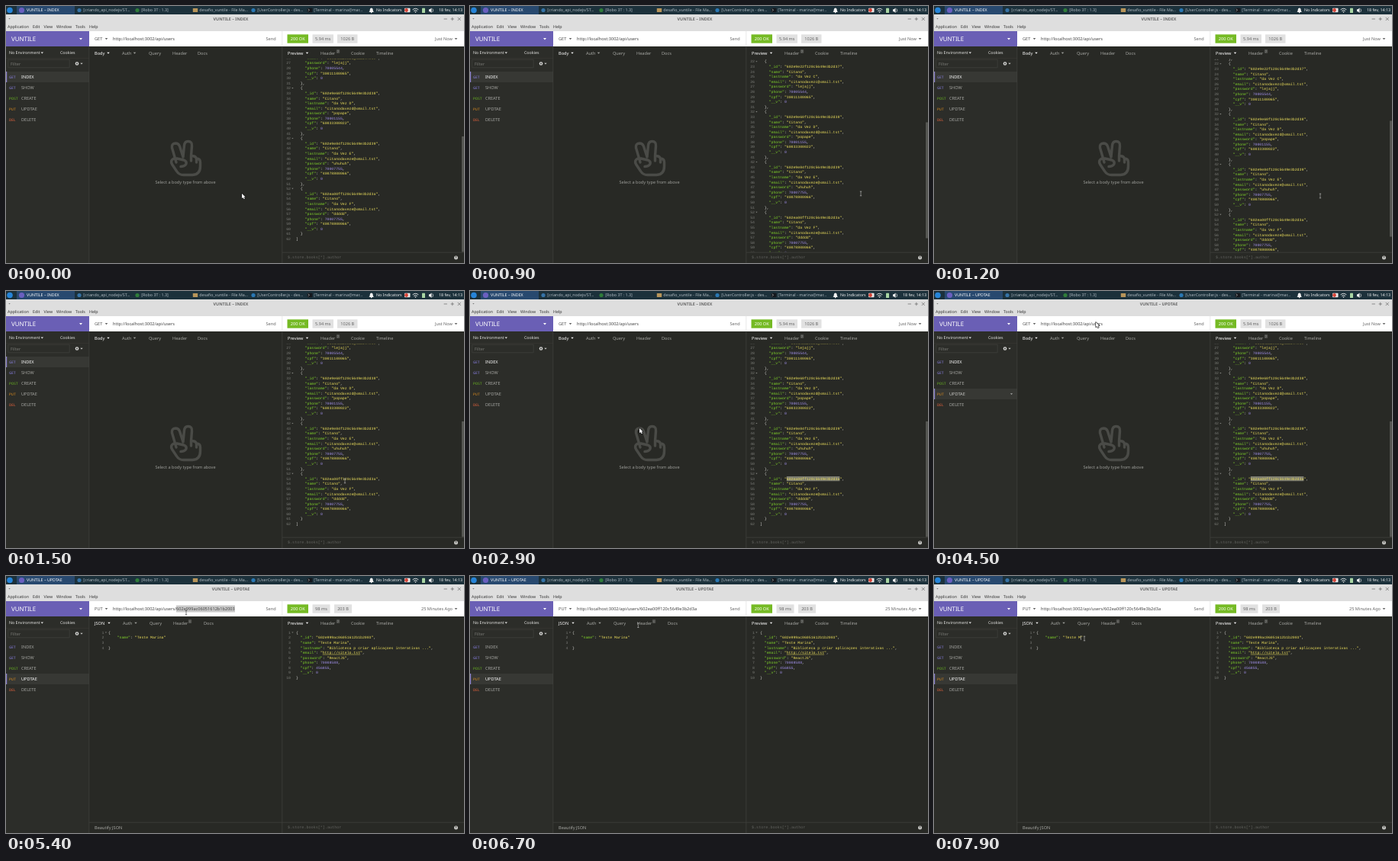
These frames come from a looping animation (600 by 337 pixels, 8 s). An HTML page with a canvas:

```html
<!DOCTYPE html>
<html lang="pt">
<head>
<meta charset="utf-8">
<title>API client</title>
<style>
html, body { margin: 0; width: 100%; height: 100%; overflow: hidden; background: #282925; }
canvas { display: block; }
</style>
</head>
<body>
<canvas id="stage" width="600" height="337"></canvas>
<script>
const ctx = document.getElementById('stage').getContext('2d');
ctx.textRendering = 'geometricPrecision';

const LOOP = 8000, STEP = 100;
const UI = '"Noto Sans", sans-serif', MONO = '"Liberation Mono", monospace';
const CODE = 4.83, CHAR = CODE * 0.6, LINE = 6.59;
const PROJECT = 'VUNTILE';
const KEY = '#7ecf2b', STRING = '#ecdf5c', NUMBER = '#a08fea', PLAIN = '#d8d8d4';
const BASE_URL = 'http://localhost:3002/api/users';
const OLD_ID = '602e999ac06051612b1b2003', NEW_ID = '602ea00ff120c5649e3b2d3a';

const REQUESTS = [
  ['GET', 'INDEX', '#8d84ea'], ['GET', 'SHOW', '#8d84ea'], ['POST', 'CREATE', '#6dbb22'],
  ['PUT', 'UPDTAE', '#e3901f'], ['DEL', 'DELETE', '#f0663f'],
];

// id, letter, email letter, password, phone, cpf
const USERS = [
  ['602e9d10f120c5649e3b2d35', 'A', 'a', 'abcabc', 70001010, '10020030044'],
  ['602e9dc1f120c5649e3b2d36', 'B', 'b', 'xyzxyz', 70002020, '20030040055'],
  ['602e9e22f120c5649e3b2d37', 'C', 'c', 'lejajj', 70005544, '30011100065'],
  ['602e9e60f120c5649e3b2d38', 'D', 'd', 'popape', 70001155, '60033300022'],
  ['602e9e84f120c5649e3b2d39', 'E', 'e', 'uhuhuh', 70007755, '40078800066'],
  [NEW_ID, 'F', 'e', 'ddddd', 70007755, '40078800066'],
];

const fields = (id, name, lastname, email, password, phone, cpf) => [
  `"_id": "${id}",`, `"name": "${name}",`, `"lastname": "${lastname}",`, `"email": "${email}",`,
  `"password": "${password}",`, `"phone": ${phone},`, `"cpf": ${cpf},`, '"__v": 0',
];
const indent = (lines, n) => lines.map(line => ' '.repeat(n) + line);

const userList = ['[', ...USERS.flatMap(([id, letter, mail, pass, phone, cpf], i) => indent([
  '{',
  ...indent(fields(id, 'Citano', 'da Vez ' + letter, `citanodavez${mail}@xmail.tst`, pass, phone, `"${cpf}"`), 2),
  i < USERS.length - 1 ? '},' : '}',
], 2)), ']'];

const singleUser = ['{', ...indent(fields(OLD_ID, 'Teste Marina',
  'Biblioteca p criar aplicaçoes interativas ...', 'http://sitelo.tst', 'ReactJS', 70008588, 456855), 2), '}'];

const SCROLL = [[400, 0], [500, 6], [900, 31], [1000, 42], [1100, 46], [1200, 34], [1300, 2], [1400, 0]];
const MOUSE = [
  [0, 309, 246], [100, 370, 249], [300, 515, 250], [500, 514, 249], [900, 512, 246], [1200, 506, 249],
  [1300, 500, 249], [1400, 470, 249], [1500, 444, 249], [2800, 444, 249], [2900, 222, 180], [3200, 130, 158],
  [3700, 32, 134], [4300, 32, 134], [4400, 140, 80], [4500, 212, 41], [5100, 228, 46], [5300, 236, 48],
  [6200, 236, 48], [6500, 232, 56], [7100, 197, 82],
];

// Linear interpolation of every value column over time
function track(keys, t) {
  const next = keys.findIndex(k => k[0] > t);
  if (next < 0) return keys.at(-1).slice(1);
  if (next === 0) return keys[0].slice(1);
  const a = keys[next - 1], b = keys[next], p = (t - a[0]) / (b[0] - a[0]);
  return a.slice(1).map((v, i) => v + (b[i + 1] - v) * p);
}

function rect(x, y, w, h, color, radius = 0) {
  ctx.fillStyle = color;
  ctx.beginPath();
  ctx.roundRect(x, y, w, h, radius);
  ctx.fill();
}

function dot(x, y, r, color) {
  ctx.fillStyle = color;
  ctx.beginPath();
  ctx.arc(x, y, r, 0, 7);
  ctx.fill();
}

// y is the middle of the capitals
function text(str, x, y, color, size = 5.6, { align = 'left', font = UI, weight = 400 } = {}) {
  ctx.font = `${weight} ${size}px ${font}`;
  ctx.textAlign = align;
  ctx.fillStyle = color;
  ctx.fillText(str, x, y + size * 0.36);
}

function caret(x, y, color, r = 2) {
  ctx.fillStyle = color;
  ctx.beginPath();
  ctx.moveTo(x - r, y - r / 2);
  ctx.lineTo(x + r, y - r / 2);
  ctx.lineTo(x, y + r * 0.7);
  ctx.fill();
}

function strokePath(d, color, width) {
  ctx.strokeStyle = color;
  ctx.lineWidth = width;
  ctx.lineJoin = ctx.lineCap = 'round';
  ctx.stroke(new Path2D(d));
}

function codeLine(line, x, y) {
  for (const m of line.matchAll(/("[^"]*"(?=:))|("[^"]*")|(\d+)|[^"\d\s]+/g)) {
    const color = m[1] ? KEY : m[2] ? STRING : m[3] ? NUMBER : PLAIN;
    const at = x + m.index * CHAR;
    text(m[0], at, y, color, CODE, { font: MONO });
    if (m[0].includes('http')) rect(at + CHAR, y + 2.5, (m[0].length - 2) * CHAR, 0.5, color);
  }
}

function codeBlock(lines, x, y, gutter) {
  lines.forEach((line, i) => {
    const ly = y + i * LINE;
    if (ly < 62 || ly > 330) return;
    text(i + 1, gutter, ly, '#7b7c78', CODE, { font: MONO, align: 'right' });
    if (/[{[]$/.test(line)) caret(gutter + 2.4, ly, '#8b8c88', 1.1);
    codeLine(line, x, ly);
  });
}

function badge(n, x) {
  rect(x - 2.2, 57, 4.4, 5, '#50514d', 1);
  text(n, x, 59.5, '#bbb', 3.2, { align: 'center' });
}

function desktopBar(title) {
  rect(0, 0, 600, 11, '#1c313b');
  dot(5, 5.5, 3.8, '#2684d8');
  rect(14, 0, 76, 11, '#28496f');
  dot(20.5, 5.5, 3.6, '#6a5fc0');
  text(title, 27, 5.5, '#fff', 5.3);
  const tasks = [
    [96, '#3674a8', '[criando_api_nodejs/ST…'], [172, '#2f7d3a', '[Robo 3T : 1.3]'],
    [248, '#b8955a', 'desafio_vuntile - File Ma…'], [324, '#2a78b4', '[UserController.js - des…'],
    [398, '#15181d', '[Terminal - marina@mar…'],
  ];
  for (const [x, color, label] of tasks) {
    if (x === 248) rect(x - 3.2, 3, 6.4, 5, color, 0.6);
    else if (x === 398) {
      rect(x - 3.2, 2.7, 6.4, 5.6, color, 0.6);
      strokePath('M396 4l1.500 1.300l-1.500 1.300', '#ddd', 0.6);
    } else dot(x, 5.5, 2.6, color);
    text(label, x + 5.3, 5.5, '#b3bdc4', 5.3);
  }
  ctx.fillStyle = '#f4f4f4';
  ctx.fill(new Path2D('M475.500 8q1.200-1 1.200-3q0-2.500 2-2.500t2 2.500q0 2 1.200 3z'));
  dot(478.7, 8.6, 0.8, '#f4f4f4');
  text('No Indicators', 485, 5.5, '#f4f4f4', 5.3);
  rect(522, 2.7, 7.5, 5.6, '#e8e8e8', 0.8);
  dot(524.5, 5.5, 2.4, '#d54438');
  strokePath('M533 4.600q3.500-2.800 7 0M534.500 6.300q2-1.600 4 0', '#f4f4f4', 0.9);
  dot(536.5, 8, 0.8, '#f4f4f4');
  rect(545, 2.7, 4, 6.3, '#a9d6a4', 0.5);
  ctx.fillStyle = '#f4f4f4';
  ctx.fill(new Path2D('M554 4.300h1.500l2-1.800v6.500l-2-1.800h-1.500z'));
  strokePath('M559 3.800q1.500 1.900 0 3.800', '#f4f4f4', 0.7);
  text('18 fev, 14:13', 567, 5.5, '#f4f4f4', 5.3);
}

function windowBar(title) {
  rect(0, 11, 600, 22, '#dedede');
  caret(4.5, 16.7, '#777', 1.2);
  text(title, 294.5, 16.7, '#666', 5.4, { align: 'center', weight: 600 });
  strokePath('M574 17h3.500M583 17h3.500M584.750 15.250v3.500M592 15.250l3.500 3.500M595.500 15.250l-3.500 3.500', '#666', 0.7);
  [['Application', 2], ['Edit', 35], ['View', 49.5], ['Window', 66], ['Tools', 91], ['Help', 109]]
    .forEach(([label, x]) => text(label, x, 27.2, '#333', 5.3));
}

function sidebar(t, active) {
  rect(0, 33, 109, 304, '#2c2d29');
  rect(0, 33, 109, 20, '#6a5fb5');
  text(PROJECT, 7, 43, '#fff', 7.9);
  caret(98, 43, '#fff');
  text('No Environment', 4, 61.3, '#e4e4e2', 5.3);
  caret(47.3, 61.3, '#e4e4e2', 1.8);
  text('Cookies', 71, 61.3, '#e4e4e2', 5.3);
  rect(0, 68.5, 109, 0.5, '#3a3b37');
  ctx.strokeStyle = '#41423e';
  ctx.lineWidth = 0.7;
  ctx.strokeRect(3.2, 70.2, 80, 10.6);
  text('Filter', 6, 75.5, '#767773');
  dot(93, 75.5, 2.3, '#d8d8d6');
  dot(93, 75.5, 0.9, '#2c2d29');
  caret(99, 75.5, '#d8d8d6', 1.6);

  const lit = t < 2000 ? 0 : t >= 3600 ? 3 : -1;
  REQUESTS.forEach(([method, name, color], i) => {
    const y = 93 + i * 14;
    if (i === lit) {
      rect(0, y - 7, 109, 14, '#373834');
      rect(0, y - 7, 1.2, 14, '#8d84d0');
    }
    text(method, 4, y, color, 4.6, { weight: 500 });
    text(name, 20, y, i === active ? '#fff' : i === lit ? '#c8c8c5' : '#a5a6a2');
  });
  if (t >= 3900 && t < 4700) caret(101.5, 135, '#aaa', 1.6);
  rect(108.5, 53, 0.7, 284, '#41423e');
}

function emptyBody() {
  strokePath('M223 205L217.500 186q-1-5.500 4.500-6q4 0 5.500 4L232 198L233.500 183q.500-5.500 5-5.500q5.500 0 5 6' +
    'L242.500 197q5.500-1 7 3q5 0 5 5v5q0 11-10 11.500h-12q-6 0-9-5l-6-9q-2.500-5 1.500-7q1.500-1 5-.500L233 202' +
    'q4 1.500 3 5q-1 3-7 3.500M242.500 197v6M249.500 200v5', '#4a4b47', 3.4);
  text('Select a body type from above', 235, 231, '#9b9c98', 5.6, { align: 'center' });
}

function requestPane(t, put) {
  rect(109, 33, 253, 20, '#fff');
  text(put ? 'PUT' : 'GET', 116, 43, '#555');
  caret(131.5, 43, '#666', 1.8);
  if (t >= 5300 && t < 6100) rect(223, 38.5, 77, 9, '#c9c9c9');
  text(BASE_URL + (put ? '/' + (t < 6100 ? OLD_ID : NEW_ID) : ''), 140, 42.8, '#444');
  text('Send', 340.5, 42.8, '#666');

  const tabs = put
    ? [['JSON', 116, 135], ['Auth', 153, 170], ['Query', 188], ['Header', 219], ['Docs', 259]]
    : [['Body', 116, 134], ['Auth', 152, 168.5], ['Query', 187], ['Header', 218], ['Docs', 251]];
  tabBar(tabs);
  if (!put) return emptyBody();
  badge(1, 241);
  const name = t < 7800 ? 'Teste Marina' : t < 7900 ? 'Teste Mar' : 'Teste M';
  codeBlock(['{', `    "name": "${name}"`, '', '}'], 134, 74, 128.5);
  if (t >= 7100) rect(146 + (9 + name.length) * CHAR, 78.3, 0.5, 5.6, '#ddd');
  rect(109, 322.7, 253, 0.7, '#41423e');
  text('Beautify JSON', 116, 329.8, '#a5a6a2');
}

function tabBar(tabs) {
  tabs.forEach(([label, x, arrow], i) => {
    const color = i ? '#a5a6a2' : '#fff';
    text(label, x, 61.5, color);
    if (arrow) caret(arrow, 61.5, color, 1.7);
  });
}

function responsePane(t, put) {
  rect(362, 33, 238, 20, '#fff');
  const pills = put ? [['98 ms', 401.5, 23], ['203 B', 430, 23]] : [['5.94 ms', 401.5, 27.5], ['1026 B', 434, 26.5]];
  for (const [label, x, w, bg = '#e1e1e1', color = '#666'] of [['200 OK', 368.5, 27.5, '#75ba24', '#fff'], ...pills]) {
    rect(x, 37.3, w, 11.4, bg);
    text(label, x + w / 2, 43, color, 5.6, { align: 'center' });
  }
  text(put ? '25 Minutes Ago' : 'Just Now', 585, 42.8, '#666', 5.6, { align: 'right' });
  caret(589.5, 43, '#666', 1.8);
  tabBar([['Preview', 369, 394.5], ['Header', 412], ['Cookie', 452], ['Timeline', 485]]);
  badge(7, 435);

  ctx.save();
  ctx.beginPath();
  ctx.rect(362, 69.5, 238, 253);
  ctx.clip();
  if (put) codeBlock(singleUser, 380, 74, 373);
  else {
    const [scroll] = track(SCROLL, t);
    const top = 246 - 52 * LINE + scroll;
    if (t >= 2000) rect(414.8, 243, 24 * CHAR, 6.3, '#7b7b70');
    codeBlock(userList, 380, top, 373);
    rect(597, 171 - scroll * 0.6, 3, 152, '#555652');
  }
  ctx.restore();

  rect(362, 322.7, 238, 0.7, '#41423e');
  text('$.store.books[*].author', 369, 329.5, '#61625e', 5.1, { font: MONO });
  dot(589.5, 330, 2.5, '#c4c4c1');
  text('?', 589.5, 330, '#282925', 4, { align: 'center', weight: 700 });
  rect(361.5, 33, 0.7, 20, '#e0e0e0');
  rect(361.5, 53, 0.7, 284, '#41423e');
}

function pointer(t) {
  const [x, y] = track(MOUSE, t);
  const beam = (t >= 200 && t < 2900) || t >= 4800;
  if (beam) {
    const color = y < 53 ? '#222' : '#ccc';
    strokePath(`M${x - 0.8} ${y - 2.8}h1.600M${x} ${y - 2.8}v5.600M${x - 0.8} ${y + 2.8}h1.600`, color, 0.55);
    return;
  }
  const arrow = `M${x} ${y}v6.200l1.500-1.300l1.200 2.400l1.200-.600l-1.200-2.300h2z`;
  strokePath(arrow, '#111', 1.2);
  ctx.fillStyle = '#fff';
  ctx.fill(new Path2D(arrow));
}

function draw(now) {
  const t = Math.floor(now % LOOP / STEP) * STEP;
  const put = t >= 4700;
  const title = `${PROJECT} – ${t < 4400 ? 'INDEX' : 'UPDTAE'}`;
  rect(0, 0, 600, 337, '#282925');
  desktopBar(title);
  windowBar(title);
  sidebar(t, put ? 3 : 0);
  requestPane(t, put);
  responsePane(t, put);
  pointer(t);
}

let start;
function tick(now) {
  start ??= now;
  draw(now - start);
  requestAnimationFrame(tick);
}
requestAnimationFrame(tick);
</script>
</body>
</html>
```
